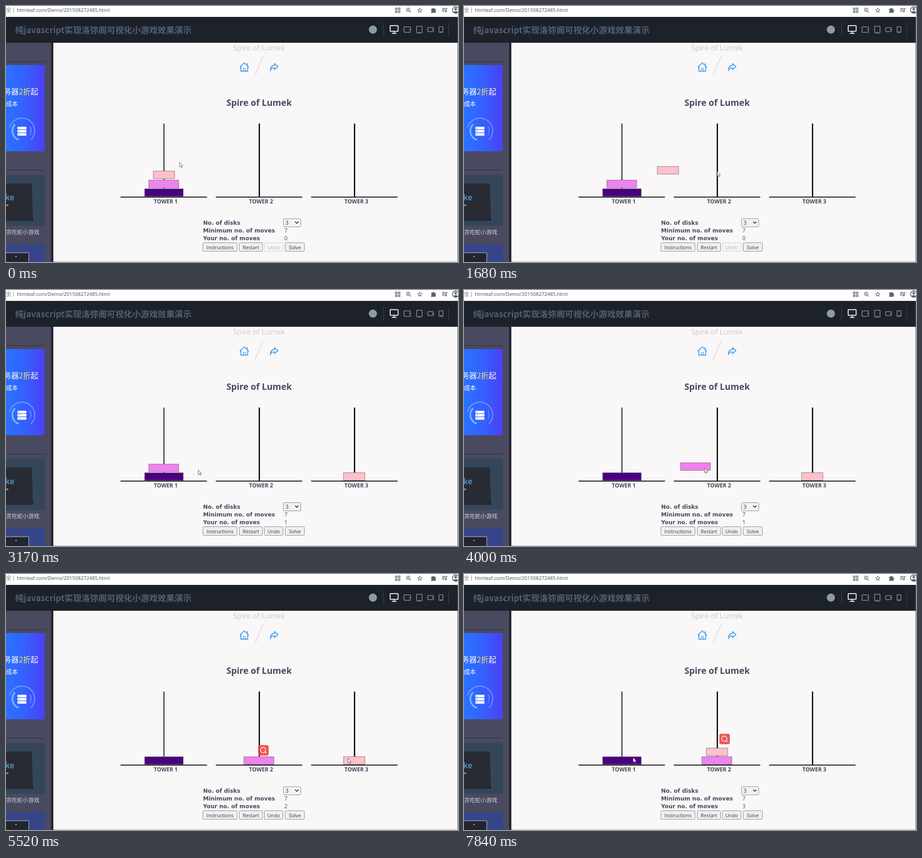
An HTML page with a canvas that plays this animation: 993 px wide and 564 px high, repeating every 7.99 s.

```html
<!DOCTYPE html>
<html lang="zh">
<head>
<meta charset="utf-8">
<title>Spire of Lumek</title>
<style>
html, body { margin: 0; width: 100%; height: 100%; overflow: hidden; background: #f9f7f8; }
canvas { display: block; }
</style>
</head>
<body>
<canvas id="stage" width="993" height="564"></canvas>
<script>
const ctx = document.getElementById('stage').getContext('2d');
const LOOP = 7990;
const STEP = 130;
const SANS = '"Open Sans", "Noto Sans", sans-serif';
const WIDE = '"DejaVu Sans", sans-serif';
const CJK = '"Noto Sans CJK SC", "Noto Sans CJK", sans-serif';
const INK = '#494a5f';
const BLUE = '#3c9cf0';
const GREY = '#5f6368';
const FILLS = ['#ffc0cb', '#ee82ee', '#4b0082'];

// Pointer glides; a drag carries a disk, a drop sets it on a tower
const GLIDES = [
  { at: 300, ms: 780, to: [350, 374] },
  { at: 1430, ms: 750, to: [739, 397], drag: 0, lag: 140 },
  { at: 2510, ms: 260, to: [762, 400], drag: 0 },
  { at: 2770, ms: 680, to: [367, 395], drop: 2 },
  { at: 3600, ms: 727, to: [568, 407], drag: 1 },
  { at: 4670, ms: 260, to: [574, 409], drag: 1 },
  { at: 5100, ms: 594, to: [759, 406], drop: 1, badge: true },
  { at: 6150, ms: 260, to: [762, 407] },
  { at: 6580, ms: 377, to: [581, 384], drag: 0, lag: 20 },
  { at: 7450, ms: STEP, to: [581, 384], drop: 1, badge: true },
  { at: 7720, ms: 260, to: [371, 404] }
];

const diskWidth = d => 47 + 19 * d;
const home = (d, tower, level) =>
  [346.9 + 209 * tower - diskWidth(d) / 2, Math.round(402 - 19.4 * level)];

// Eased travel; drags rise in a shallow arc
function travel([x, y], g, ms) {
  const p = Math.max(0, Math.min(1, ms / g.ms));
  const s = p * p * (3 - 2 * p);
  const dx = g.to[0] - x;
  const lift = g.drag === undefined ? 0 : Math.min(22, Math.abs(dx) / 8);
  return [x + dx * s, y + (g.to[1] - y) * s - lift * Math.sin(Math.PI * s)];
}

function pose(t) {
  const spots = FILLS.map((_, d) => home(d, 0, 2 - d));
  const heights = [0, 0, 0];
  let pointer = [381, 344], held = null, grab, badge = null, moves = 0;
  for (const g of GLIDES) {
    if (t < g.at) break;
    const from = pointer;
    const run = (Math.floor((t - g.at) / STEP + 0.1) + 1) * STEP;
    if (g.drag !== undefined) {
      if (held === null) {
        held = g.drag;
        grab = from.map((v, i) => v - spots[held][i]);
        badge = null;
        heights.fill(0);
        spots.forEach(([x], d) => {
          if (d !== held) heights[Math.round((x + diskWidth(d) / 2 - 347) / 209)]++;
        });
      }
      spots[held] = travel(from, g, run - (g.lag || 0)).map((v, i) => v - grab[i]);
    }
    if (g.drop !== undefined) {
      spots[held] = home(held, g.drop, heights[g.drop]);
      held = null;
      moves++;
      if (g.badge && run > STEP) badge = [from[0] - 20, from[1] - 32];
    }
    pointer = travel(from, g, run);
  }
  return { spots, pointer, badge, moves };
}

function rect(x, y, w, h, fill) {
  ctx.fillStyle = fill;
  ctx.fillRect(x, y, w, h);
}

function box(x, y, w, h, r, fill, stroke, lw = 1) {
  ctx.beginPath();
  ctx.roundRect(x, y, w, h, r);
  if (fill) { ctx.fillStyle = fill; ctx.fill(); }
  if (stroke) { ctx.strokeStyle = stroke; ctx.lineWidth = lw; ctx.stroke(); }
}

function path(d, stroke, lw = 1, fill, x = 0, y = 0) {
  ctx.save();
  ctx.translate(x, y);
  const p = new Path2D(d);
  if (fill) { ctx.fillStyle = fill; ctx.fill(p); }
  if (stroke) { ctx.strokeStyle = stroke; ctx.lineWidth = lw; ctx.stroke(p); }
  ctx.restore();
}

function ring(x, y, r, stroke, lw, from = 0, to = Math.PI * 2) {
  ctx.beginPath();
  ctx.arc(x, y, r, from, to);
  ctx.strokeStyle = stroke;
  ctx.lineWidth = lw;
  ctx.stroke();
}

function dot(x, y, r, fill) {
  ctx.beginPath();
  ctx.arc(x, y, r, 0, Math.PI * 2);
  ctx.fillStyle = fill;
  ctx.fill();
}

function text(s, x, y, font, fill, align = 'left') {
  ctx.font = font;
  ctx.fillStyle = fill;
  ctx.textAlign = align;
  ctx.fillText(s, x, y);
}

function star(x, y, r) {
  ctx.beginPath();
  for (let i = 0; i < 10; i++) {
    const a = i * Math.PI / 5, d = i % 2 ? r * 0.45 : r;
    ctx.lineTo(x + d * Math.sin(a), y - d * Math.cos(a));
  }
  ctx.closePath();
  ctx.strokeStyle = GREY;
  ctx.lineWidth = 1.1;
  ctx.stroke();
}

function browserBar() {
  rect(0, 0, 993, 24, '#fff');
  text('全', 0, 13, '11.5px ' + CJK, '#777');
  rect(16, 4, 1, 11, '#888');
  text('htmleaf.com/Demo/201508272485.html', 24, 13, '10.9px ' + SANS, '#4a4d52');
  for (let i = 0; i < 4; i++) {
    box(855.5 + i % 2 * 6.5, 4.5 + (i >> 1) * 6.5, 3.5, 3.5, 0, null, GREY, 1.4);
  }
  ring(883.5, 8.5, 3.7, GREY, 1.4);
  path('M886.5 11.5l3 3M882 8.5h3M883.5 7v3', GREY, 1.2);
  star(909, 9.5, 5);
  path('M934 6h3a1.8 1.8 0 0 1 3.6 0h3v3a1.8 1.8 0 0 1 0 3.4v2.6h-9.6v-3a1.7 1.7 0 0 0 0-3.2z', null, 0, GREY);
  path('M958 5.5h8m-8 3h8m-8 3h5M967.5 12V5.5h2.5', GREY, 1.4);
  dot(966, 12.2, 1.8, GREY);
  ring(988, 9, 7, GREY, 1.8);
  dot(988, 7, 2.7, GREY);
  path('M983 13.5q5-5 10 0v1q-5 3-10 0z', null, 0, GREY);
}

function device(x, w, h) {
  const c = '#858d95';
  box(x, 52 - h / 2, w, h, 1, null, c, 1.6);
  if (w > h) rect(x + w - 3, 51, 2, 2, c);
  else rect(x + w / 2 - 1.5, 49.5 + h / 2, 3, 2, c);
}

function header() {
  rect(0, 24, 993, 57, '#1d2129');
  text('纯javascript实现洛弥阁可视化小游戏效果演示', 20, 60, 'bold 18.6px ' + CJK, '#526077');
  dot(806, 52, 9, '#8c9ca6');
  rect(829, 38, 1, 30, '#3c4854');
  rect(972, 37, 1, 31, '#3c4854');
  box(844, 43.2, 17.5, 12.5, 1, null, '#eef0f2', 2);
  path('M852.8 56v4M847.5 60.3h10.5', '#eef0f2', 2);
  device(874.5, 14, 12);
  device(902, 12, 15);
  device(926.5, 12.5, 9);
  device(951.3, 8.5, 12.5);
}

function advert() {
  const g = ctx.createLinearGradient(0, 0, 85, 0);
  ['#2b72ff', '#3560ff', '#4c3ff4'].forEach((c, i) => g.addColorStop(i / 2, c));
  rect(0, 130, 85, 190, g);
  const font = '16.8px ' + CJK;
  text('务器', -5.5, 195, font, '#fff');
  text('2折', 28, 195, font, '#f5e663');
  text('起', 54, 195, font, '#fff');
  text('成本', 0, 220, '13px ' + CJK, '#fff');
  ring(35, 275, 28, 'rgba(140,185,255,.7)', 2, -2.9, .8);
  ring(35, 275, 21, '#82b2ff', 3.5, 1.9, 3.9);
  ring(35, 275, 20, 'rgba(130,178,255,.6)', 2, -.5, .5);
  for (let y = 266; y < 286; y += 7) {
    box(25, y, 20, 5.8, 1.5, '#fff');
    dot(28.5, y + 3, .9, '#4b78ee');
  }
}

function sidebar() {
  rect(0, 81, 99, 483, INK);
  rect(99, 81, 5, 483, '#22252f');
  rect(0, 122, 85, 1, '#2b2d3b');
  rect(0, 361, 85, 1, '#2b2d3b');
  advert();
  box(-5, 372, 90.5, 112.5, 4, '#35465a');
  path('M0 391H54q3 0 3 3l2 74-7 3H0z', null, 0, '#292b34');
  path('M0 471h52l8-4v6H0z', null, 0, '#22242c');
  text('ke', -2, 428, 'bold 17px ' + SANS, '#5189b4');
  rect(0, 437, 5, 4, '#777b83');
  text('贪吃蛇小游戏', 0, 503, '12.2px ' + CJK, '#d0d2d8');
  box(-5, 525, 90.5, 50, 4, '#36458a');
  box(-5, 543.5, 55, 30, 2, '#22242e', '#9a9fb2', 1.5);
  dot(22, 552, 1.3, '#d8dae0');
}

function button(s, x, w, on = true) {
  box(x + .5, 521.5, w - 1, 19, 2, on ? '#efefef' : '#f6f4f5', on ? '#85858a' : '#d2d1d3');
  text(s, x + w / 2, 535.5, '10.8px ' + SANS, on ? '#38383c' : '#b4b3b6', 'center');
}

function page(moves) {
  rect(104, 81, 889, 483, '#f9f7f8');
  text('Spire of Lumek', 556, 98, '16.4px ' + SANS, '#c9c8cd', 'center');
  path('M513.5 135l10-9.8 10 9.8M516 133.5v10h15v-10M530 126v4', BLUE, 1.8);
  path('M521.5 143.5v-6h4.5v6', BLUE, 1.2);
  path('M565 111L546.5 154.5', '#d9d7da', 1.6);
  path('M590 127l7.5 6.5-7.5 6.5v-3.5q-6-.5-9 5 0-10 9-11z', BLUE, 1.8);
  text('Spire of Lumek', 556, 220, 'bold 19.3px ' + SANS, INK, 'center');

  for (let i = 0; i < 3; i++) {
    rect(346 + 209.2 * i, 259, i ? 2.7 : 2, 162, i ? '#000' : '#101b1d');
    rect(251.5 + 209.4 * i, 420, 190, 2, '#151515');
    text('TOWER ' + (i + 1), 351 + 209.3 * i, 435, 'bold 12px ' + SANS, INK, 'center');
  }

  const labels = ['No. of disks', 'Minimum no. of moves', 'Your no. of moves'];
  labels.forEach((s, i) => text(s, 433, 482 + 17 * i, 'bold 12.35px ' + WIDE, INK));
  box(609.5, 468.5, 38, 18, 2, '#f3f1f2', '#85858a');
  path('M635.2 475l3.6 3.8 3.6-3.8', '#222', 1.7);
  text('3', 614, 482, '12px ' + SANS, '#38383c');
  text('7', 611.5, 499, '12px ' + SANS, INK);
  text(moves, 611.5, 516, '12px ' + SANS, INK);
  button('Instructions', 432, 76);
  button('Restart', 512, 52);
  button('Undo', 567, 42, moves > 0);
  button('Solve', 613, 43);
}

function disk([x, y], d) {
  box(Math.floor(x) + .5, Math.round(y) + .5, diskWidth(d), 17, 0, FILLS[d], '#808080');
}

function searchBadge([x, y]) {
  ctx.globalAlpha = .9;
  box(x, y, 23, 23, 4, '#f04545');
  ctx.globalAlpha = 1;
  ring(x + 10.8, y + 10.8, 5.8, '#fff', 1.4);
  path('M15 15l3 3', '#fff', 1.6, null, x, y);
}

function arrow([x, y]) {
  path('M0 0v10.2L2.4 8 4 11.8l1.6-.7L4 7.4h3.2z', '#55565c', .9, '#fff',
    Math.round(x) + .5, Math.round(y) + .5);
}

function draw(t) {
  const { spots, pointer, badge, moves } = pose(t);
  page(moves);
  sidebar();
  header();
  browserBar();
  rect(992, 24, 1, 540, '#55585f');
  rect(104, 563, 889, 1, '#aaa9ad');
  for (let d = 2; d >= 0; d--) disk(spots[d], d);
  if (badge) searchBadge(badge);
  arrow(pointer);
}

const start = performance.now();
function tick() {
  draw((performance.now() - start) % LOOP);
  requestAnimationFrame(tick);
}
tick();
</script>
</body>
</html>
```
